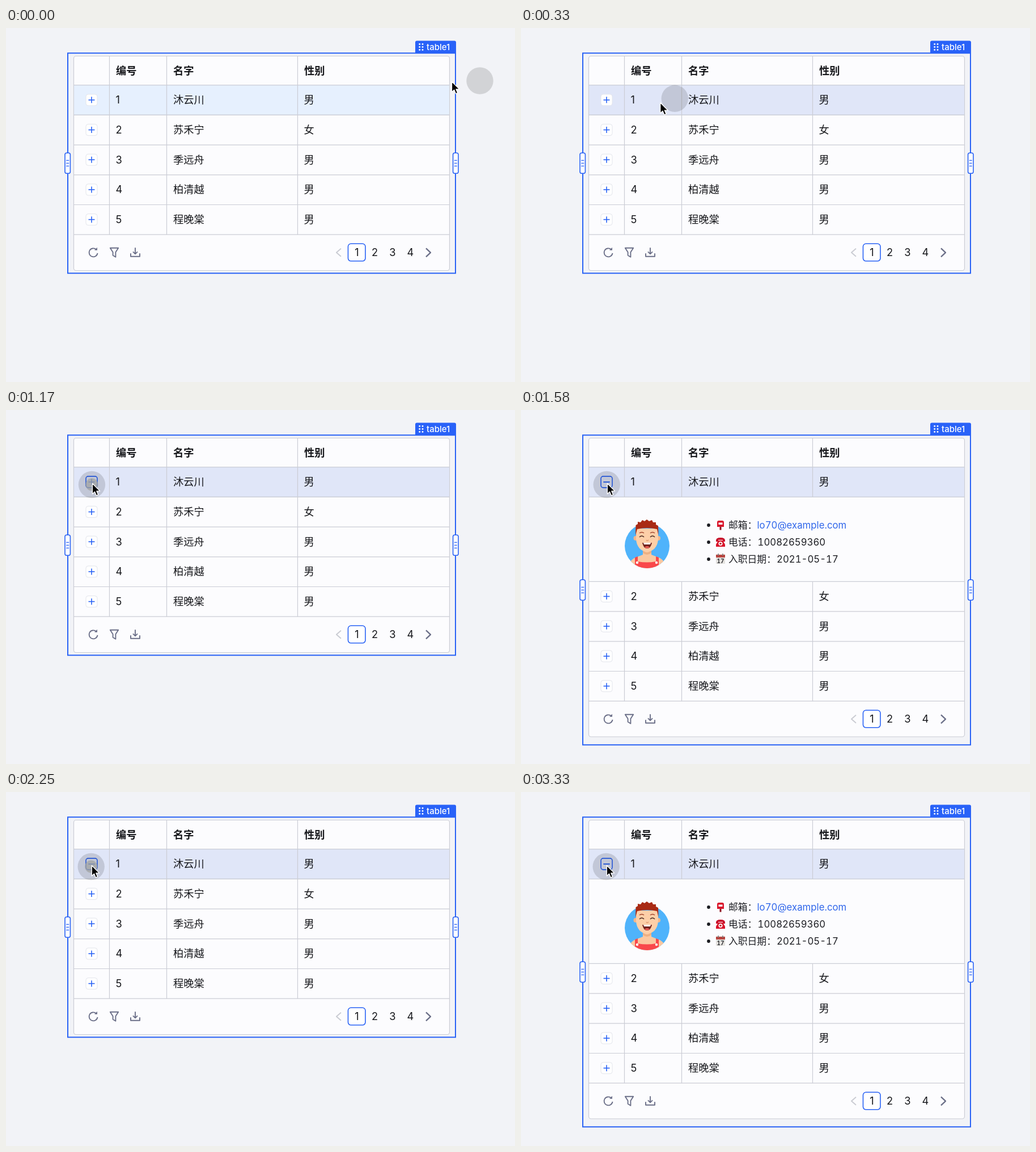
Write an HTML page that moves like this. It is 898 px wide and 624 px high and loops after 4330 ms.

```html
<!DOCTYPE html>
<html lang="zh-CN">
<head>
<meta charset="utf-8">
<style>
  html, body { margin: 0; overflow: hidden; background: #f2f3f7; }
  svg { display: block; width: 898px; height: 624px; }
  text { font: 18.3px Inter, "Noto Sans CJK SC", sans-serif; fill: #16171b; }
  .head { font-weight: 600; }
  .mid { text-anchor: middle; }
  .tag { font-size: 15px; font-weight: 500; fill: #fff; }
  .info text { font-size: 16.8px; font-variant-numeric: tabular-nums; fill: #1c1d22; }
  .info .link { fill: #2f66ea; }
  .grid { stroke: #cbcdd5; stroke-width: 1.2; fill: none; }
  .blue { stroke: #2962f5; stroke-width: 1.6; fill: none; }
  .icon { stroke: #6b6f88; stroke-width: 1.9; fill: none; stroke-linejoin: round; }
</style>
</head>
<body>
<svg id="stage" viewBox="0 0 898 624"></svg>
<script>
const LOOP = 4330, FPS = 12;
const TOGGLES = [1250, 2250, 3000];
const ROW = 52.7, TOP = 100.7, GROW = 149;
const people = [['沐云川', '男'], ['苏禾宁', '女'], ['季远舟', '男'], ['柏清越', '男'], ['程晚棠', '男']];
const columns = [182.5, 283.5, 514.5];

const label = (x, cy, s, cls = '') => `<text x="${x}" y="${cy + 6.5}" class="${cls}">${s}</text>`;
const at = (x, y, body, attrs = '') => `<g transform="translate(${x} ${y})" ${attrs}>${body}</g>`;
const path = (d, attrs = '') => `<path d="${d}" ${attrs}/>`;
const verticals = (y1, y2) => path(columns.map(x => `M${x} ${y1}V${y2}`).join(''), 'class="grid"');
const line = y => path(`M119.5 ${y}H782.5`, 'class="grid"');

const button = id => `
  <rect ${id ? 'id="button"' : ''} x="-10" y="-10" width="20" height="20" rx="4" fill="#fff" stroke="#e3e5ec"/>
  ${path('M-5.5 0H5.5', `class="blue" ${id ? 'id="barH"' : ''}`)}
  ${path('M0-5.5V5.5', `class="blue" ${id ? 'id="barV"' : ''}`)}`;

function row(i) {
  const cy = TOP + ROW * (i + .5) - .2, [name, sex] = people[i];
  return at(151, cy, button(i === 0)) +
    label(193.5, cy, i + 1) + label(295, cy, name) + label(525.5, cy, sex);
}

const handle = x => at(x, 238.3, `
  <rect x="-4.7" y="-18" width="9.4" height="36" rx="3" fill="#fff" class="blue" style="fill:#fff"/>
  ${path('M-2.5-5H2.5M-2.5 0H2.5M-2.5 5H2.5', 'class="blue" style="stroke-width:1.3"')}`);

const tag = path('M722 44V25.5Q722 22.5 725 22.5H791Q794 22.5 794 25.5V44Z', 'fill="#2962f8"') +
  [28.5, 33.5, 38.5].map(y => [729.7, 735].map(x =>
    `<circle cx="${x}" cy="${y}" r="1.45" fill="#fff"/>`).join('')).join('') +
  `<text x="742" y="39" class="tag">table1</text>`;

const footer = at(0, 395.8, `<g class="icon">
    ${at(154, 0, path('M5-5.6A7.5 7.5 0 1 0 7.5 1') + path('M7-9V-4H2Z', 'fill="#6b6f88" stroke="none"'))}
    ${at(191, 0, path('M-7.2-8H7.2L2.4-.5V8L-2.4 5V-.5Z'))}
    ${at(228, 0, path('M-8 1.5V7H8V1.5M0-8.5V2.5M-4-1.5L0 2.5L4-1.5'))}
    ${path('M591-7L583 0L591 7', 'stroke="#c9cbd2"')}
    ${path('M741-7.5L749 0L741 7.5', 'stroke-width="2.3"')}
  </g>
  <rect x="603.5" y="-15.5" width="30.5" height="30.5" rx="5" class="blue" style="fill:#fff"/>` +
  [1, 2, 3, 4].map((n, i) => label(619 + 31.5 * i, 0, n, 'mid')).join(''));

const avatar = `
  <clipPath id="disc"><path d="M183 180H262V239.5A39.5 39.5 0 0 1 183 239.5Z"/></clipPath>
  <circle cx="222.5" cy="239.5" r="39.5" fill="#4fb3fb"/>
  <g clip-path="url(#disc)">
    ${path('M190 280Q190 263 205 259L215 255V243H230V255L240 259Q255 263 255 280Z', 'fill="#fbc8a0"')}
    ${path('M215 247Q222 255 230 247V252Q222 258 215 252Z', 'fill="#efb083"')}
    ${path('M201 280V260L206 258V267Q222 270 238 267V258L243 260V280Z', 'fill="#f9484b"')}
    <circle cx="205" cy="269" r="2.2" fill="#fff"/><circle cx="239" cy="269" r="2.2" fill="#fff"/>
    <circle cx="202.5" cy="226" r="4" fill="#f3b78c"/><circle cx="242" cy="226" r="4" fill="#f3b78c"/>
    ${path('M203 209H242V228Q240 248 222.5 250Q205 248 203 228Z', 'fill="#fdcfa8"')}
    ${path('M202 221L202.500 203L206 201L206 197L211 198L214 194L218 196L222 193L226 196L231 194L233 198L238 198L238 202L242 204L242.500 221L240 210Q222 206 205 210Z', 'fill="#a92a14"')}
    ${path('M209 217Q213 214 217 217M228 217Q232 214 236 217', 'fill="none" stroke="#a0422a" stroke-width="1.5"')}
    ${path('M209 224Q213 220 217 224M228 224Q232 220 236 224', 'fill="none" stroke="#4c2a20" stroke-width="1.5"')}
    ${path('M221 229Q222.500 232 225 229', 'fill="none" stroke="#e09a70" stroke-width="1.500"')}
    ${path('M214 234H231Q229 244 222.500 244Q216 244 214 234Z', 'fill="#74251f"')}
    ${path('M216 234H229L228 237H217Z', 'fill="#fff"')}
    ${path('M218 242Q222.500 238 227 242Q222.500 245 218 242Z', 'fill="#ef5b55"')}
  </g>`;

const mailbox = at(352, 203, `
  ${path('M-6-5Q-6-8 -3-8H3Q6-8 6-5V3H-6Z', 'fill="#d9142b"')}
  ${path('M-1.500 3H1.500V8.500H-1.500Z', 'fill="#8e1722"')}
  ${path('M-3.500-4.500H3.500V-1H-3.500Z', 'fill="#fff"')}`);
const phone = at(352, 233, `
  ${path('M-8-3Q-8-8 0-8Q8-8 8-3V-1H4V-4H-4V-1H-8Z', 'fill="#c8102a"')}
  ${path('M-4-3H4L8 4V8H-8V4Z', 'fill="#d9142b"')}
  <circle cy="2.500" r="3.500" fill="#fff"/><circle cy="2.500" r="1.800" fill="#b51124"/>`);
const calendar = at(352, 263, `
  ${path('M-8-8H8V8H-8Z', 'fill="#e4e2df"')}${path('M-8-8H8V-3H-8Z', 'fill="#b9443f"')}
  ${path('M-4-10V-6M4-10V-6', 'stroke="#777" stroke-width="1.500"')}
  <text class="mid" y="6.500" style="font-size:10px;font-weight:600">17</text>`);

const details = avatar + `<g class="info">` +
  [203, 233, 263].map(y => `<circle cx="331" cy="${y}" r="2.900" fill="#1c1d22"/>`).join('') +
  mailbox + phone + calendar +
  label(366, 202.5, '邮箱：') + label(416.5, 202.5, 'lo70@example.com', 'link') +
  label(366, 232.5, '电话：') + label(417.5, 232.5, '10082659360') +
  label(366, 262.5, '入职日期：') + label(451, 262.5, '2021-05-17') + '</g>';

stage.innerHTML = `
  <rect id="frame" x="109" y="44.300" width="684" class="blue" style="stroke-width:2"/>
  ${tag}
  <rect id="table" x="119.500" y="49.500" width="663" rx="4" class="grid" style="fill:#fcfcfe"/>
  <rect id="hover" x="120" y="101" width="662" height="52.400"/>
  ${line(TOP)}${line(TOP + ROW)}${verticals(49.5, TOP + ROW)}
  ${label(194, 75.5, '编号', 'head')}${label(295, 75.5, '名字', 'head')}${label(526, 75.5, '性别', 'head')}
  ${row(0)}
  <g id="details">${details}</g>
  <g id="lower">
    ${[1, 2, 3, 4, 5].map(i => line(TOP + ROW * i)).join('')}${verticals(TOP + ROW, TOP + ROW * 5)}
    ${[1, 2, 3, 4].map(row).join('')}${footer}
  </g>
  <g id="handles">${handle(108.7)}${handle(793.3)}</g>
  <circle id="halo" r="23.700" fill="#000" fill-opacity=".135"/>
  <circle id="press" r="11" fill="#a0a3a2"/>
  <g id="cursor">${path('M0 0V18.500L4.200 14.600L7 21.300L10.300 19.900L7.500 13.400H13.300Z', 'fill="#000" stroke="#fff" stroke-width="1.300" stroke-linejoin="round"')}</g>`;

const el = id => document.getElementById(id);
const set = (id, attrs) => { for (const k in attrs) el(id).setAttribute(k, attrs[k]); };
const clamp = v => Math.max(0, Math.min(1, v));
const smooth = v => (v = clamp(v)) * v * (3 - 2 * v);
const mix = (a, b, p) => a + (b - a) * p;
const glide = (t, from, to, tau) => to + (from - to) * Math.exp(-((t / tau) ** 1.2));

function draw(t) {
  const open = (t >= TOGGLES[0] && t < TOGGLES[1]) || t >= TOGGLES[2];
  const turn = TOGGLES.reduce((p, s, i) => p + (i % 2 ? -1 : 1) * smooth((t - s) / 300), 0);
  const pressed = Math.max(...TOGGLES.map(s => clamp((t - s + 250) / 167) * clamp((s + 250 - t) / 250)));

  set('frame', { height: open ? 546 : 388 });
  set('table', { height: open ? 526.5 : 378 });
  set('lower', { transform: `translate(0 ${open ? GROW : 0})` });
  set('handles', { transform: `translate(0 ${open ? 79 : 0})` });
  set('details', { visibility: open ? 'visible' : 'hidden' });

  const tint = clamp(t / 330);
  set('hover', { fill: `rgb(${mix(230, 224, tint)},${mix(240, 230, tint)},${mix(254, 248, tint)})` });

  const over = clamp((t - 750) / 250);
  set('button', {
    stroke: `rgb(${mix(227, 41, over)},${mix(229, 98, over)},${mix(236, 245, over)})`,
    'stroke-width': mix(1, 1.6, over),
    fill: `rgba(255,255,255,${1 - over})`
  });
  set('barH', { transform: `rotate(${-180 * (1 - turn)})` });
  set('barV', { transform: `rotate(${90 * turn})` });

  const shift = t > 1910 ? 1 : 0;
  const swoop = Math.sin(Math.PI / 2 * clamp(t / 583)), settle = smooth((t - 583) / 500);
  const haloX = glide(t, 836, 151.2, 210) - shift;
  const haloY = 93 + 40 * swoop - 1.5 * settle;
  const tipX = glide(t, 786.5, 152.3, 194) - shift;
  const tipY = 94.5 + 47.5 * swoop - 12.5 * settle;
  set('halo', { cx: haloX, cy: haloY });
  set('press', { cx: haloX, cy: haloY, opacity: .75 * pressed });
  set('cursor', { transform: `translate(${tipX} ${tipY})` });
}

function tick() {
  const step = Math.floor((performance.now() % LOOP + 4) * FPS / 1000);
  draw(step * 1000 / FPS);
  requestAnimationFrame(tick);
}
tick();
</script>
</body>
</html>
```
